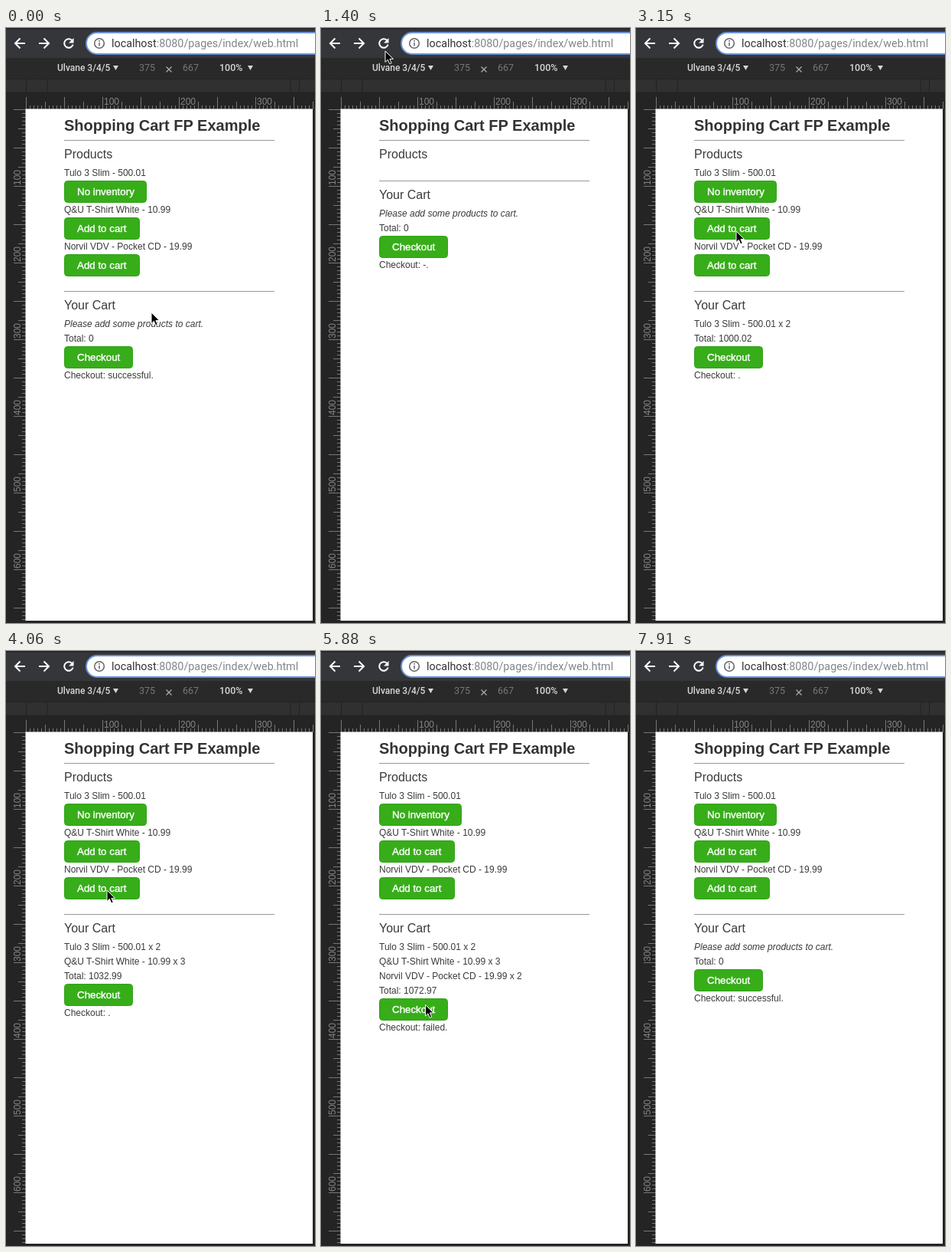
An HTML page for the animation above (8120 ms loop, 404x776 px).

```html
<!DOCTYPE html>
<html lang="en">
<head>
<meta charset="utf-8">
<title>Shopping cart demo</title>
<style>
  html, body { margin: 0; width: 100%; height: 100%; overflow: hidden; background: #242424; }
  svg { display: block; }
  text { white-space: pre; }
  #page { font: 12px "Liberation Sans", Arial, sans-serif; fill: #3a3a3a; }
  #chrome { font: 12px Roboto, sans-serif; fill: #d6d6d6; }
  .label { font: 12px "Liberation Sans", Arial, sans-serif; fill: #848484; }
  .icon { fill: none; stroke: #fff; stroke-width: 2; }
</style>
</head>
<body>
<svg width="404" height="776" viewBox="0 0 404 776">
  <rect width="404" height="776" fill="#242424"/>
  <g id="chrome">
    <rect width="404" height="39" fill="#35363a"/>
    <rect width="404" height="1.5" fill="#222326"/>
    <rect x="105" y="6" width="330" height="28" rx="14" fill="#fff" stroke="#6a92d4" stroke-width="2"/>
    <path class="icon" d="M25 20H12.500M18.500 13.500 12 20l6.500 6.500M43 20h12.500M49.500 13.500 56 20l-6.500 6.500"/>
    <path class="icon" d="M86 15.800A5.800 5.800 0 1 0 87.600 21.500"/>
    <path d="M88.500 13v6.500h-6.500z" fill="#fff"/>
    <circle cx="122" cy="20" r="6.300" fill="none" stroke="#5f6368" stroke-width="1.500"/>
    <path d="M122 19v4.500M122 16v1.700" stroke="#5f6368" stroke-width="1.500"/>
    <text x="138" y="25" font-size="14.350" fill="#80868b"><tspan fill="#333">localhost</tspan>:8080/pages/index/web.html</text>
    <rect y="39" width="404" height="27" fill="#292929"/>
    <text x="67" y="56" font-weight="500">Ulvane 3/4/5</text>
    <text x="174" y="56" fill="#777" font-size="12.500">375</text>
    <path d="M209.500 50.500l7 7m0-7l-7 7" stroke="#aaa" stroke-width="1.300"/>
    <text x="231" y="56" fill="#777" font-size="12.500">667</text>
    <text x="279" y="56" font-size="12.500" font-weight="500">100%</text>
    <path d="M140 49h7l-3.500 6zM316 49h7l-3.500 6z"/>
    <rect y="67" width="404" height="17" fill="#303030"/>
    <path d="M0 66.500H404M0 84H404M26.500 67v17M54 67v17M372 67v17M383.500 67v17" stroke="#222"/>
  </g>
  <g id="ruler"></g>
  <rect x="25.500" y="105.500" width="375.500" height="667.500" fill="#fff"/>
  <g id="page"></g>
  <g id="pointer">
    <g id="ring" fill="none" transform="translate(0 1)">
      <circle r="19.800" stroke="#fff" stroke-width="5"/>
      <circle r="20" stroke="#000" stroke-width="3"/>
    </g>
    <path d="M0 0V14.500l3.400-3.200 2.300 5.500 2.500-1.100-2.300-5.300h4.600z" stroke="#fff"/>
  </g>
</svg>
<script>
const $ = id => document.getElementById(id);
const LOOP = 8120, STEP = 70, LAST = 7910;
const RELOAD = 1190, LOADED = 1540;

const products = [
  { name: 'Tulo 3 Slim', price: 500.01, stock: 2, adds: [2240, 2450] },
  { name: 'Q&amp;U T-Shirt White', price: 10.99, stock: 10, adds: [3220, 3430, 3640] },
  { name: 'Norvil VDV - Pocket CD', price: 19.99, stock: 10, adds: [4130, 4340] }
];
const clicks = [1120, ...products.flatMap(p => p.adds), 4900, 6160, 6930];

// time, x, y of the pointer tip
const path = [
  [0, 190, 371], [210, 190, 371], [980, 84, 30], [1470, 84, 30],
  [2030, 130, 212], [2520, 130, 212], [2800, 131, 265], [3710, 131, 265],
  [4000, 132, 312], [4410, 132, 312], [4760, 139, 472], [5110, 139, 472],
  [5320, 136.5, 461.5], [7350, 136.5, 461.5], [7910, 245, 790]
];

// time at which the checkout message changes
const messages = [
  [0, 'successful.'], [RELOAD, '-.'], [2240, '.'], [5460, 'failed.'],
  [6230, '.'], [6580, 'failed.'], [7000, '.'], [7210, 'successful.']
];

const text = (x, y, s, attrs = '') => `<text x="${x}" y="${y}" ${attrs}>${s}</text>`;
const rule = y => `<path d="M76 ${y + .5}H351" stroke="#999"/>`;
const button = (y, s, width) =>
  `<rect x="76.500" y="${y + .5}" width="${width - 1}" height="28" rx="4" fill="#37ad1a" stroke="#31a318"/>` +
  text(93, y + 19, s, 'font-size="13.333" fill="#fff" stroke="#fff" stroke-width=".4"');

function ruler() {
  let ticks = '', labels = '';
  const size = n => n % 50 == 0 ? 16 : n % 25 == 0 ? 10 : 5;
  for (let n = 0; n <= 667; n += 5) {
    if (n <= 375) ticks += `M${n + 26.5} 106v${-size(n)}`;
    ticks += `M26 ${n + 106.5}h${-size(n)}`;
    if (n == 0 || n % 100) continue;
    if (n <= 375) labels += text(n + 28, 100, n, 'class="label"');
    labels += text(0, 0, n, `class="label" transform="translate(18.5 ${n + 105}) rotate(-90)"`);
  }
  return `<path d="${ticks}" stroke="#777"/>` + labels;
}

function pageAt(t) {
  const loaded = t < RELOAD || t >= LOADED;
  const inCart = t >= RELOAD && t < 7210;
  const message = messages.filter(m => m[0] <= t).pop()[1];
  let out = text(76, 134, 'Shopping Cart FP Example', 'font-size="20" font-weight="bold" fill="#333"') +
    rule(146) + text(76, 170, 'Products', 'font-size="16"');
  let y = 199, total = 0;
  const lines = [];
  for (const p of products) {
    const bought = p.adds.filter(a => a <= t).length;
    const soldOut = t < RELOAD || bought >= p.stock;
    const line = `${p.name} - ${p.price}`;
    if (loaded) {
      const empty = p.stock == 2 && soldOut;
      out += text(76, y - 6, line) +
        button(y, empty ? 'No inventory' : 'Add to cart', empty ? 108 : 99);
      y += 48;
    }
    if (inCart && bought) {
      lines.push(`${line} x ${bought}`);
      total += p.price * bought;
    }
  }
  out += rule(y) + text(76, y + 24, 'Your Cart', 'font-size="16"');
  y += 47;
  if (!lines.length) {
    out += text(76, y, 'Please add some products to cart.', 'font-style="italic"');
    y += 19;
  }
  for (const line of lines) {
    out += text(76, y, line);
    y += 19;
  }
  return out + text(76, y, 'Total: ' + +total.toFixed(2)) +
    button(y + 6, 'Checkout', 90) + text(76, y + 48, 'Checkout: ' + message);
}

function pointerAt(t) {
  const i = path.findIndex(k => k[0] > t);
  if (i < 0) return path[path.length - 1].slice(1);
  const [t0, x0, y0] = path[i - 1], [t1, x1, y1] = path[i];
  const u = (t - t0) / (t1 - t0), e = u * u * (3 - 2 * u);
  return [x0 + (x1 - x0) * e, y0 + (y1 - y0) * e];
}

let shown = '';
function draw(now) {
  const t = Math.min(LAST, Math.floor(now % LOOP / STEP) * STEP);
  const page = pageAt(t);
  if (page != shown) $('page').innerHTML = shown = page;
  $('pointer').setAttribute('transform', `translate(${pointerAt(t)})`);
  $('ring').style.display = clicks.some(c => t >= c && t < c + 2 * STEP) ? '' : 'none';
  requestAnimationFrame(draw);
}

$('ruler').innerHTML = ruler();
draw(performance.now());
</script>
</body>
</html>
```
